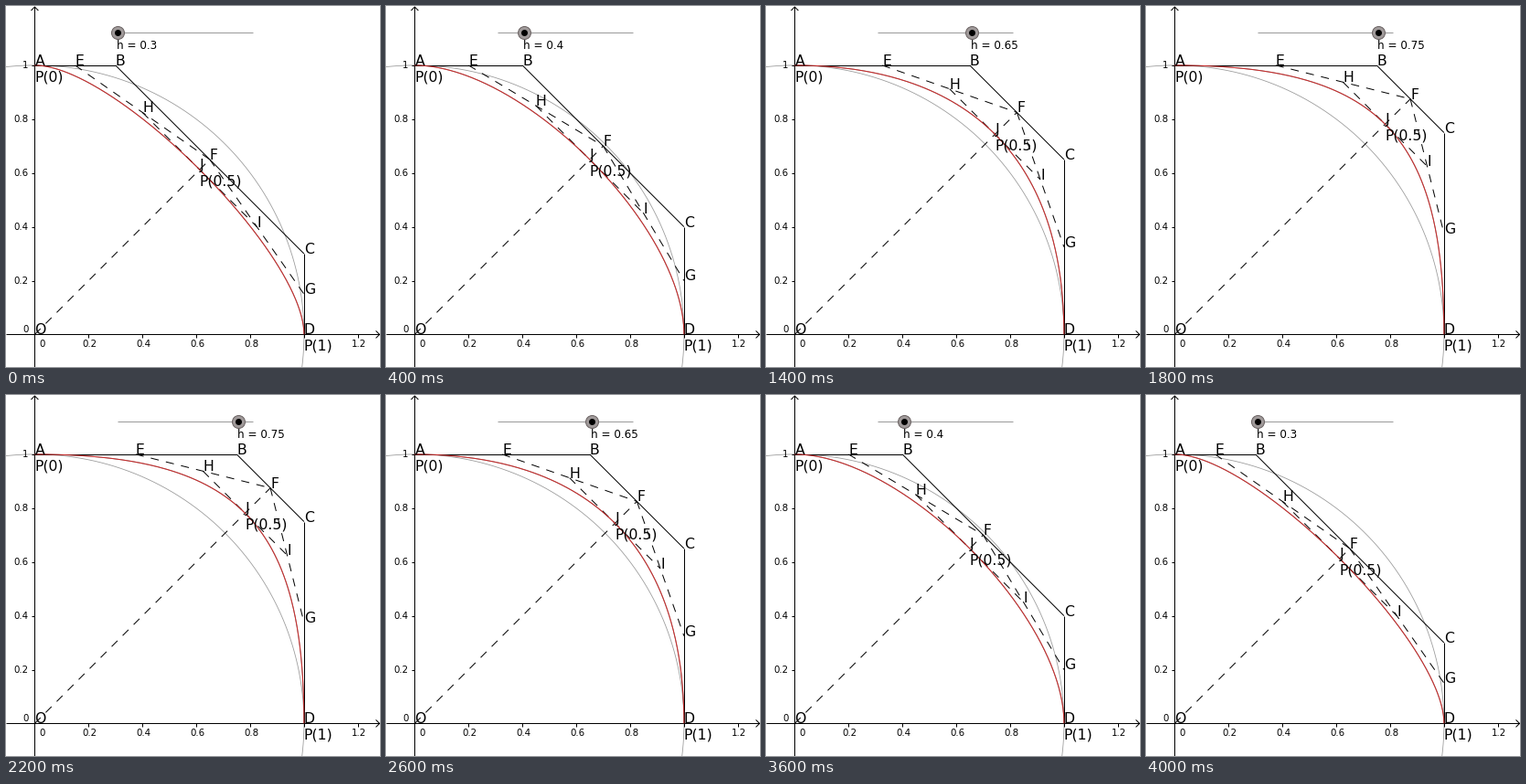
Write a matplotlib script that moves like this. It is 409 by 395 pixels and loops after 4.2 s.

```python
import numpy as np
import matplotlib.pyplot as plt
from matplotlib.animation import FuncAnimation

W, H, DPI = 409, 395, 64
PX = 72 / DPI                      # points per pixel
ORIGIN, UNIT = np.array([31.4, 359.4]), 294.5
SLIDER_X, SLIDER_Y = 122, 29
FRAMES, INTERVAL = 21, 200
GREY = "#9a9a9a"

plt.rcParams["font.family"] = "DejaVu Sans"
fig = plt.figure(figsize=(W / DPI, H / DPI), dpi=DPI, facecolor="white")
ax = fig.add_axes([0, 0, 1, 1])
ax.set(xlim=(0, W), ylim=(H, 0))
ax.axis("off")


def to_px(points):
    return ORIGIN + np.asarray(points, float) * [UNIT, -UNIT]


def stroke(points=((0, 0),), color="black", width=1, z=2, **kw):
    xy = np.asarray(points, float)
    return ax.plot(xy[:, 0], xy[:, 1], color=color, lw=width * PX, zorder=z,
                   solid_capstyle="butt", **kw)[0]


def write(x, y, text, size, **kw):
    return ax.text(x, y, text, fontsize=size * PX, va="baseline", zorder=6, **kw)


def draw_axes():
    ox, oy = ORIGIN
    stroke([(0, oy), (W, oy)])
    stroke([(ox, 1), (ox, H)])
    stroke([(W - 4.5, oy - 4), (W - 0.5, oy), (W - 4.5, oy + 4)])
    stroke([(ox - 4, 5), (ox, 1), (ox + 4, 5)])
    for k in range(7):
        value = k / 5
        x, y = to_px((value, value))
        stroke([(x, oy), (x, oy + 3.5)])
        if value != 1:
            write(x + 1.5 if k else 40, 373, f"{value:g}", 10.3, ha="center")
        if k < 6:
            stroke([(ox - 3.5, y), (ox, y)])
            write(24.4, y + 3.5 if k else 357, f"{value:g}", 10.3, ha="right")


def draw_circle():
    angle = np.linspace(-0.2, np.pi / 2 + 0.2, 300)
    stroke(to_px(np.c_[np.cos(angle), np.sin(angle)]), GREY, 0.8, z=1)


draw_axes()
draw_circle()
stroke([(SLIDER_X, SLIDER_Y), (270, SLIDER_Y)], GREY)

# Separate segments keep the level and upright sides crisp.
SEGMENTS = ["AB", "BC", "CD", "EF", "FG", "HI", "OF"]
segments = [stroke() for _ in SEGMENTS]
for line in segments[3:]:
    line.set(dashes=(9, 8), dash_capstyle="butt")
curve_under = stroke(z=3, alpha=0.45)
curve = stroke(color="#cc2a2a", z=4)
knob = stroke(marker="o", ms=14 * PX, mfc="#a09a9a", mec="#6c6464", mew=PX, z=5)
dot = stroke(marker="o", ms=7 * PX, mec="none", z=5.5)
slider_label = write(0, 47, "", 12)
names = {n: write(0, 0, n, 15.7) for n in "OABCDEFGHIJ"}
values = {n: write(0, 0, t, 15.7)
          for n, t in (("A", "P(0)"), ("J", "P(0.5)"), ("D", "P(1)"))}


def construct(h):
    p = {"O": (0, 0), "A": (0, 1), "B": (h, 1), "C": (1, h), "D": (1, 0)}
    p = {n: to_px(v) for n, v in p.items()}
    for n, (a, b) in zip("EFGHIJ", ("AB", "BC", "CD", "EF", "FG", "HI")):
        p[n] = (p[a] + p[b]) / 2
    return p


def bezier(a, b, c, d):
    t = np.linspace(0, 1, 200)[:, None]
    s = 1 - t
    return s**3 * a + 3 * s**2 * t * b + 3 * s * t**2 * c + t**3 * d


def update(i):
    h = 0.8 - 0.05 * abs(i - 10)
    p = construct(h)
    for line, (a, b) in zip(segments, SEGMENTS):
        line.set_data(*np.transpose([p[a], p[b]]))
    for line in (curve_under, curve):
        line.set_data(*bezier(*(p[n] for n in "ABCD")).T)

    x = SLIDER_X + 293.5 * (h - 0.3)
    for marker in (knob, dot):
        marker.set_data([x], [SLIDER_Y])
    slider_label.set_x(x - 1)
    slider_label.set_text(f"h = {round(h, 2):g}")
    for n, label in names.items():
        label.set_position(p[n])
    for n, label in values.items():
        label.set_position(p[n] + [0, 17.3])


anim = FuncAnimation(fig, update, frames=FRAMES, interval=INTERVAL,
                     repeat=True, repeat_delay=0)
plt.show()
```
